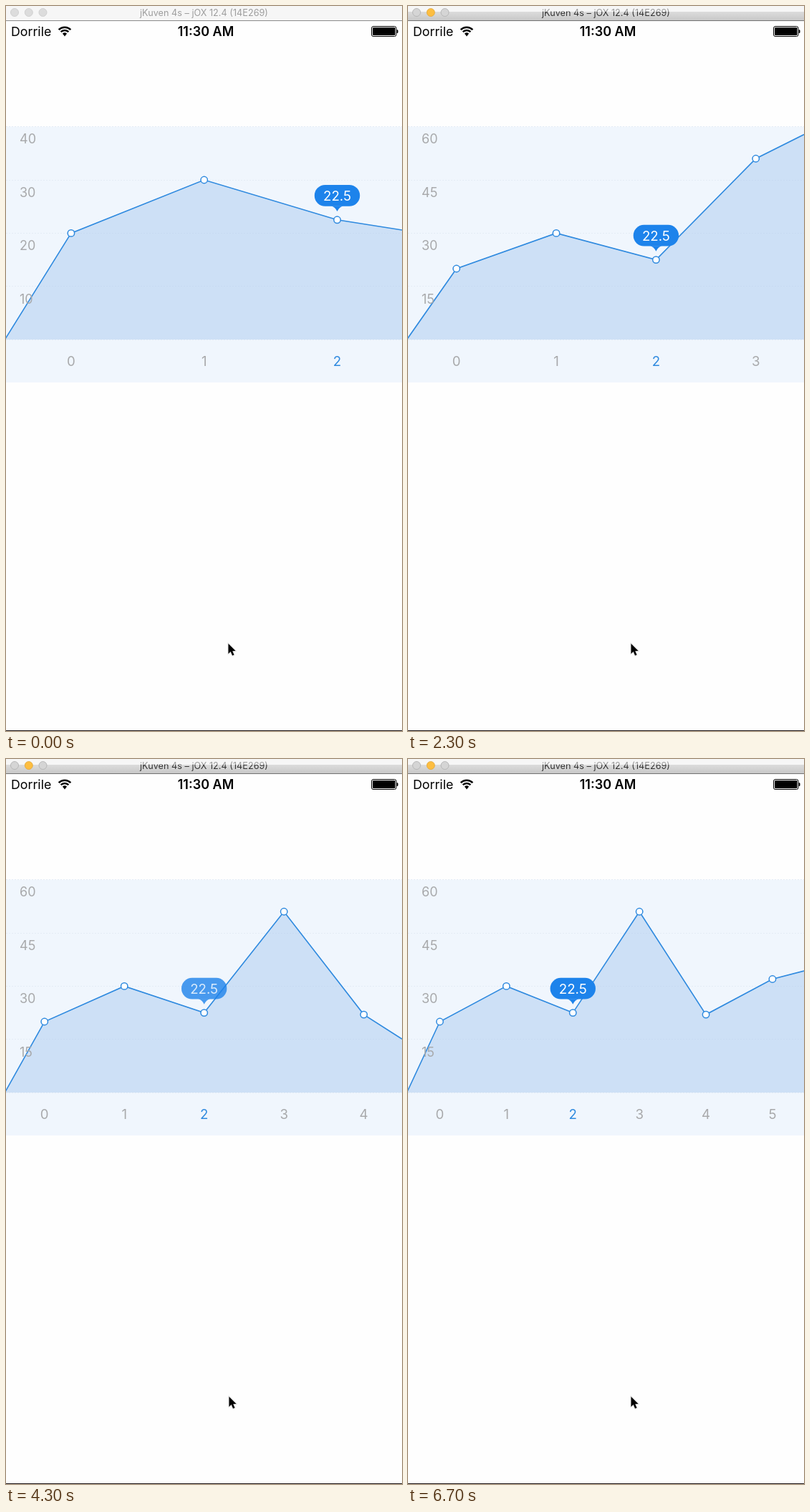
Animation of 553 by 1013 pixels, one loop 6.9 s. Source, as an HTML page with a canvas:

```html
<!DOCTYPE html>
<html lang="en">
<head>
<meta charset="utf-8">
<title>Line chart</title>
<style>
  html, body { margin: 0; width: 100%; height: 100%; overflow: hidden; background: #fff; }
  canvas { display: block; }
</style>
</head>
<body>
<canvas id="stage" width="553" height="1013"></canvas>
<script>
const W = 553, H = 1013, LOOP = 6900, STEP = 100;
const TOP = 168.6, BASE = 466.2, BOTTOM = 526, ROW = (BASE - TOP) / 4;
const BLUE = '#2f8adf', GREY = '#a8a9ab';
const VALUES = [20, 30, 22.5, 51, 22, 32];
const SELECTED = 2;
const FOCUS_AT = 100, REVEAL = 800, FADE = 400, POPUP_FADE = 250;

// edge: the value where the line leaves the right side of the view
const PHASES = [
  { start: -5000, popup: -1000, count: 3, max: 40, edge: 20.6 },
  { start: 406, popup: 2020, count: 4, max: 60, edge: 57.8 },
  { start: 2510, popup: 4100, count: 5, max: 60, edge: 15.1 },
  { start: 4500, popup: 6400, count: 6, max: 60, edge: 34.3 }
];

const ctx = document.getElementById('stage').getContext('2d');
const clamp = v => Math.max(0, Math.min(1, v));
const ease = v => 0.5 - 0.5 * Math.cos(Math.PI * clamp(v));

function text(str, x, y, size, color, align = 'center', weight = 400) {
  ctx.font = `${weight} ${size}px Inter, sans-serif`;
  ctx.textAlign = align;
  ctx.fillStyle = color;
  ctx.fillText(str, x, y);
}

function rect(x, y, w, h, color) {
  ctx.fillStyle = color;
  ctx.fillRect(x, y, w, h);
}

function roundRect(x, y, w, h, r) {
  ctx.beginPath();
  ctx.roundRect(x, y, w, h, r);
}

function circle(x, y, r, fill, stroke, width) {
  ctx.beginPath();
  ctx.arc(x, y, r, 0, 2 * Math.PI);
  ctx.fillStyle = fill;
  ctx.fill();
  ctx.strokeStyle = stroke;
  ctx.lineWidth = width;
  ctx.stroke();
}

function polygon(points) {
  ctx.beginPath();
  points.forEach(([x, y]) => ctx.lineTo(x, y));
  ctx.closePath();
}

function clipped(x, y, w, h, draw) {
  ctx.save();
  ctx.beginPath();
  ctx.rect(x, y, w, h);
  ctx.clip();
  draw();
  ctx.restore();
}

function drawTitleBar(active) {
  const title = color => text('jKuven 4s – jOX 12.4 (14E269)', 276.5, 13.7, 12.7, color);
  rect(0, 0, W, 20, '#f6f6f6');
  title('#9d9d9d');
  if (active) {
    clipped(0, 8, W, 12, () => {
      const shade = ctx.createLinearGradient(0, 8, 0, 20);
      shade.addColorStop(0, '#dcdcdc');
      shade.addColorStop(1, '#c8c8c8');
      rect(0, 8, W, 12, shade);
      title('#333');
    });
  }
  rect(0, 20, W, 1, active ? '#737373' : '#8a8a8a');
  [12, 31.8, 51.5].forEach((x, i) => {
    if (active && i === 1) circle(x, 9, 5.5, '#fdbe41', '#e0a63a', 0.8);
    else circle(x, 9, 5.5, active ? '#d5d5d5' : '#dcdcdc', active ? '#b4b4b4' : '#cdcdcd', 0.9);
  });
}

function drawStatusBar() {
  text('Dorrile', 7, 42, 17.8, '#000', 'left');
  text('11:30 AM', 279, 42, 18, '#000', 'center', 600);

  const from = -0.75 * Math.PI, to = -0.25 * Math.PI;
  ctx.strokeStyle = ctx.fillStyle = '#000';
  ctx.lineWidth = 2.5;
  for (const r of [11.8, 7.6]) {
    ctx.beginPath();
    ctx.arc(82, 41.5, r, from, to);
    ctx.stroke();
  }
  ctx.beginPath();
  ctx.moveTo(82, 42.5);
  ctx.arc(82, 41.5, 4.3, from, to);
  ctx.fill();

  roundRect(510.5, 28.5, 34.5, 14, 2.5);
  ctx.lineWidth = 1;
  ctx.stroke();
  roundRect(512, 30, 31.5, 11, 1.2);
  ctx.fill();
  roundRect(545.7, 33, 1.8, 5, [0, 1.5, 1.5, 0]);
  ctx.fill();
}

function drawPopup(x, y, label) {
  ctx.fillStyle = '#1d83eb';
  roundRect(x - 31.7, y - 48.8, 63.4, 29.8, 14.9);
  ctx.fill();
  ctx.beginPath();
  ctx.moveTo(x - 8, y - 19.3);
  ctx.quadraticCurveTo(x - 3, y - 18, x, y - 11.8);
  ctx.quadraticCurveTo(x + 3, y - 18, x + 8, y - 19.3);
  ctx.fill();
  text(label, x, y - 26.8, 18.7, '#fff');
}

function drawChart(t) {
  const phase = PHASES.filter(p => t >= p.start).pop();
  const { count, max, edge } = phase;
  const gap = 557.4 / count;
  const yOf = v => BASE - v / max * (BASE - TOP);
  const points = VALUES.slice(0, count).map((v, i) => [276.7 + (i - (count - 1) / 2) * gap, yOf(v)]);
  const age = t - phase.start;
  const popup = clamp((t - phase.popup) / POPUP_FADE);

  rect(0, TOP, W, BOTTOM - TOP, '#f0f6fd');
  ctx.strokeStyle = '#e4ecf5';
  ctx.lineWidth = 1;
  ctx.setLineDash([2, 2]);
  for (let i = 0; i < 5; i++) {
    const y = Math.floor(TOP + i * ROW) + 0.5;
    ctx.beginPath();
    ctx.moveTo(0, y);
    ctx.lineTo(W, y);
    ctx.stroke();
  }
  ctx.setLineDash([]);

  clipped(0, TOP, ease(age / REVEAL) * 557 - 2, BASE - TOP, () => {
    const line = [[-1.7, BASE], ...points, [W, yOf(edge)]];
    polygon([...line, [W, BASE]]);
    ctx.fillStyle = 'rgba(164,196,237,.46)';
    ctx.fill();
    ctx.beginPath();
    line.forEach(([x, y]) => ctx.lineTo(x, y));
    ctx.strokeStyle = BLUE;
    ctx.lineWidth = 1.6;
    ctx.stroke();
  });

  for (let i = 0; i < 4; i++) {
    text(max * (4 - i) / 4, 19, 192.4 + i * ROW, 18, GREY, 'left');
  }
  points.forEach(([x], i) => {
    text(i, x, 502.8, 18.7, popup > 0 && i === SELECTED ? BLUE : GREY);
  });

  ctx.globalAlpha = clamp((age - REVEAL) / FADE);
  for (const [x, y] of points) circle(x, y, 4.7, '#fff', BLUE, 1.5);
  ctx.globalAlpha = popup;
  drawPopup(...points[SELECTED], VALUES[SELECTED]);
  ctx.globalAlpha = 1;
}

function drawCursor(x, y) {
  ctx.save();
  ctx.translate(x, y);
  polygon([[0, 0], [0, 14], [3.2, 11], [5.6, 16.5], [8, 15.5], [5.7, 10.2], [10, 10]]);
  ctx.lineWidth = 1.6;
  ctx.strokeStyle = '#ddd';
  ctx.stroke();
  ctx.fillStyle = '#000';
  ctx.fill();
  ctx.restore();
}

function frame(now) {
  const t = Math.floor(now % LOOP / STEP) * STEP;
  const active = t >= FOCUS_AT;
  rect(0, 0, W, H, '#fefefe');
  drawTitleBar(active);
  drawStatusBar();
  drawChart(t);
  drawCursor(active ? 311.5 : 310.5, 891);
  rect(0, H - 1, W, 1, '#1d1517');
  requestAnimationFrame(frame);
}
requestAnimationFrame(frame);
</script>
</body>
</html>
```
